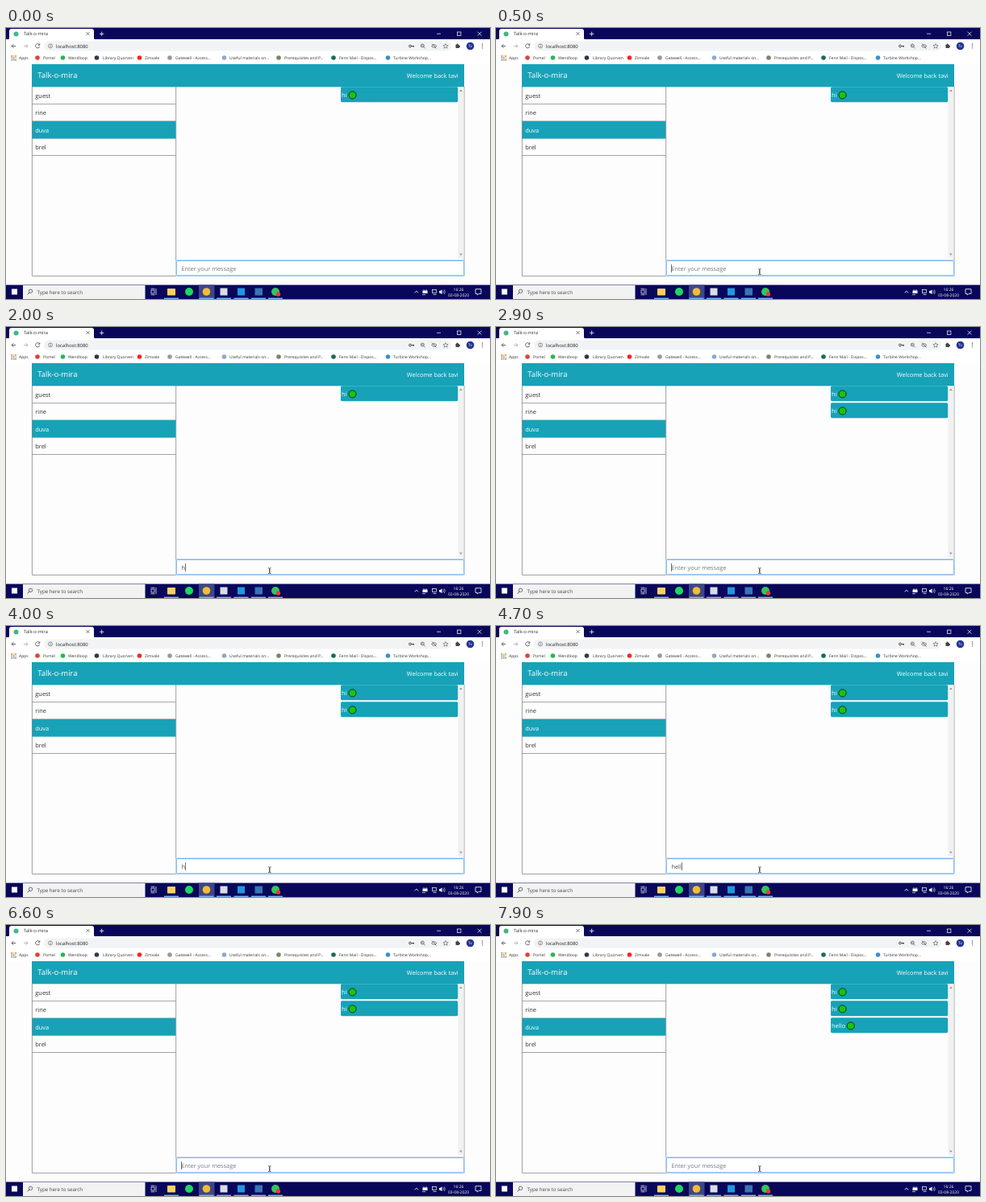
Recreate the animation shown at these times as an HTML page. Size 600 by 337 pixels, loop 8 s.

```html
<!DOCTYPE html>
<html lang="en">
<head>
<meta charset="utf-8">
<title>Chat</title>
<style>
html, body { margin: 0; width: 100%; height: 100%; overflow: hidden; background: #fdfdfe; }
svg { display: block; width: 100vw; height: 100vh; }
text { font-family: "Open Sans", "Noto Sans", sans-serif; text-rendering: geometricPrecision; white-space: pre; }
</style>
</head>
<body>
<svg id="stage" viewBox="0 0 600 337" preserveAspectRatio="none"></svg>
<script>
const LOOP = 8000, TEAL = '#17a2b8', NAVY = '#08075a';
const stage = document.getElementById('stage');

const rect = (x, y, w, h, fill, more = '') =>
  `<rect x="${x}" y="${y}" width="${w}" height="${h}" fill="${fill}" ${more}/>`;
const dot = (x, y, r, fill, more = '') =>
  `<circle cx="${x}" cy="${y}" r="${r}" fill="${fill}" ${more}/>`;
const line = (d, stroke, width = 1, more = '') =>
  `<path d="${d}" fill="none" stroke="${stroke}" stroke-width="${width}" ${more}/>`;
const label = (x, y, size, fill, str, more = '') =>
  `<text x="${x}" y="${y}" font-size="${size}" fill="${fill}" ${more}>${str}</text>`;
const END = 'text-anchor="end"', MID = 'text-anchor="middle"';

function titleBar() {
  return rect(0, 0, 600, 15, NAVY) +
    '<path d="M1 15Q4 15 4 12V4Q4 1 7 1H106Q109 1 109 4V12Q109 15 112 15Z" fill="#fff"/>' +
    dot(12.5, 7.5, 3, '#41b883') +
    label(22, 9.4, 5.8, '#333', 'Talk-o-mira') +
    line('M99.5 5l4 4m0-4l-4 4', '#444', .7) +
    line('M116 7.3h5.4m-2.7-2.7v5.4', '#fff', .8) +
    line('M534 7.2h5M584.5 4.7l5 5m0-5l-5 5', '#fff', .7) +
    rect(559.5, 5, 4.4, 4.4, 'none', 'stroke="#fff" stroke-width=".7"');
}

function toolbar() {
  return rect(0, 14, 600, 31, '#fff') + rect(47, 16.5, 505, 12, '#f1f3f4', 'rx="6"') +
    line('M12 22.5H7m2.5-2.5L7 22.5 9.5 25', '#444', .8) +
    line('M22 22.5h5m-2.5-2.5l2.5 2.5-2.5 2.5', '#aaa', .8) +
    line('M41.4 20.8a2.6 2.6 0 1 0 .3 2.4M41.8 19.4v1.9h-1.9', '#444', .8) +
    line('M55 21.8v2.1M55 20.4v.7', '#555', .6) +
    dot(55, 22.4, 2.5, 'none', 'stroke="#555" stroke-width=".6"') +
    label(62, 24.6, 5.9, '#222', 'localhost:8080') +
    dot(501, 22.5, 1.4, 'none', 'stroke="#444" stroke-width="1"') +
    line('M502.4 22.5h3.6m-1 0v1.4', '#444') +
    dot(516.3, 22, 2, 'none', 'stroke="#444" stroke-width=".7"') +
    line('M517.8 23.5l1.8 1.8m-4.4-3.3h2.2', '#444', .7) +
    line('M527.5 22.5q3-3.6 6.4 0q-3.4 3.6-6.4 0M528 19.5l5.5 6', '#444', .7) +
    line('M545 19.5l.9 2 2.2.2-1.7 1.4.6 2.1-2-1.2-2 1.2.6-2.1-1.7-1.4 2.2-.2Z', '#555', .6) +
    rect(557.5, 20.7, 4.4, 4.4, '#444', 'rx=".6"') +
    dot(559.5, 20.5, 1.1, '#444') + dot(562, 23, 1.1, '#444') +
    dot(575.5, 22.5, 4.8, '#253494') + label(575.5, 24.3, 4.6, '#fff', 'Tv', MID) +
    [20, 22.4, 24.8].map(y => dot(590.5, y, .65, '#444')).join('');
}

// x of the icon, its colour, x of the label, label
const bookmarks = [
  [39, '#dc4437', 46, 'Pomel'],
  [70.5, '#25b94f', 77, 'Wendloop'],
  [112.5, '#30364c', 120, 'Library Quorven'],
  [165.5, '#f22', 172, 'Zimvale'],
  [203, '#999', 210, 'Gatewell - Access...'],
  [270.5, '#8aa9d0', 277, 'Useful materials on...'],
  [338, '#7b8565', 345, 'Prerequisites and P...'],
  [406, '#176b54', 413, 'Fenn Mail - Dispos...'],
  [473.5, '#3d8fc8', 480, 'Turbine Workshop...']
];

function bookmarkBar() {
  const colors = ['#e94335', '#f4b400', '#34a853', '#4285f4'];
  let out = '';
  for (let i = 0; i < 9; i++)
    out += rect(6.5 + i % 3 * 2.4, 34.2 + Math.floor(i / 3) * 2.4, 1.5, 1.5, colors[i % 4]);
  out += label(16, 39, 5, '#333', 'Apps');
  for (const [ix, color, tx, name] of bookmarks)
    out += dot(ix, 37, 2.8, color) + label(tx, 39, 5, '#333', name);
  return out;
}

function page() {
  const people = ['guest', 'rine', 'duva', 'brel'];
  return rect(0, 45, 600, 275, '#fdfdfe') +
    people.map((name, i) => {
      const y = 73.3 + i * 21.3, active = i === 2;
      return (active ? rect(32, y, 178.5, 21.3, TEAL) : '') +
        line(`M32 ${y + 21.3}H210.5`, active ? TEAL : '#8b8d90', .8) +
        label(36.3, y + 13.7, 7.4, active ? '#fff' : '#333', name);
    }).join('') +
    line('M32.4 73V308.4H568V73M210.7 73V308', '#85878a', .8) +
    rect(32, 45, 536, 28.3, TEAL) +
    label(39.3, 62.3, 9.5, '#fff', 'Talk-o-mira') +
    label(560.7, 61.8, 7.4, '#fff', 'Welcome back tavi', END) +
    rect(560.3, 73.3, 7.2, 212.7, '#f1f1f1') +
    '<path d="M562 79l1.9-2.4 1.9 2.4ZM562 280.5l1.9 2.4 1.9-2.4Z" fill="#999"/>';
}

function bubble(row, word, circleX) {
  const y = 73.2 + row * 21;
  return `<g id="bubble${row}">` + rect(415, y, 145.2, 19, TEAL, 'rx="1.6"') +
    label(416, y + 12.8, 7.4, '#fff', word) +
    dot(circleX, y + 10.2, 4.6, '#16c60c', 'stroke="#1d2b1d" stroke-width="1"') + '</g>';
}

function inputBox() {
  return rect(211, 289, 357, 19.2, '#fff', 'rx="1.5" stroke="#b9d9fb" stroke-width="2"') +
    rect(211.4, 289.5, 356.2, 18.2, '#fff', 'rx="1.3" stroke="#78b0ea" stroke-width=".9"') +
    label(217.4, 301.9, 7.35, '#747b82', 'Enter your message', 'id="hint"') +
    label(217.4, 301.9, 7.35, '#495057', '', 'id="typed"') +
    rect(217.3, 294, .7, 10, '#333', 'id="caret"') +
    line('M325 299.6q1.8 0 1.8 1v5q0 1-1.8 1M328.6 299.6q-1.8 0-1.8 1v5q0 1 1.8 1', '#222', .7, 'id="pointer"');
}

function taskbar() {
  const underline = x => rect(x - 9, 335.6, 18, 1.4, '#79b5ec');
  return rect(0, 319.5, 600, 17.5, NAVY) +
    rect(7, 324.5, 7, 7, '#fff') +
    rect(21, 320, 151.5, 17, '#f2f2f3') +
    dot(30.5, 327.3, 2.2, 'none', 'stroke="#333" stroke-width=".7"') +
    line('M29 329l-2.4 2.5', '#333', .8) +
    label(38.5, 330.8, 6.2, '#444', 'Type here to search') +
    rect(239, 319.5, 19.5, 17.5, '#3d4686') +
    rect(180, 326, 4, 4, 'none', 'stroke="#fff" stroke-width=".7"') +
    line('M179.6 324.2h4.8M179.6 331.8h4.8M186 324v8', '#fff', .7) +
    rect(200, 324, 10, 8.5, '#f8d25c', 'rx=".7"') +
    dot(227, 328, 5, '#1ed760') +
    dot(248.5, 328, 4.8, '#f2bd32') +
    rect(265.5, 323.5, 9, 9, '#d9dde5') +
    rect(287, 323.5, 9, 9, '#2196e0') +
    rect(308.5, 323.5, 9.5, 9, '#3975b5') +
    dot(334, 328, 5, '#35c557') + dot(337.5, 331, 2.7, '#e33d39') +
    [205, 248.5, 270, 291.5, 313, 334].map(underline).join('') +
    line('M506.5 329.3l2.3-2.3 2.3 2.3', '#fff', .8) +
    rect(516.5, 326.5, 6, 3.5, '#fff') +
    line('M518 325v1.5M521 325v1.5M516 331.6h4', '#fff', .7) +
    rect(528.5, 325.5, 5, 4, 'none', 'stroke="#fff" stroke-width=".7"') +
    line('M529.5 331.5h4', '#fff', .7) +
    '<path d="M537 327h1.4l2-1.8v6l-2-1.8H537Z" fill="#fff"/>' +
    line('M541.7 326.5q1.3 1.7 0 3.5M543.2 325.3q2.2 3 0 5.8', '#fff', .6) +
    label(561, 326.5, 5, '#fff', '16:26', MID) +
    label(561, 334.3, 5, '#fff', '03-08-2020', MID) +
    line('M582 324.7h7v5.7h-3l-1.7 1.7v-1.7H582Z', '#fff', .8);
}

stage.innerHTML = titleBar() + toolbar() + bookmarkBar() + page() +
  bubble(0, 'hi', 429.5) + bubble(1, 'hi', 429.5) + bubble(2, 'hello', 439.7) +
  inputBox() + taskbar();

const part = id => document.getElementById(id);
const [hint, typed, caret, pointer] = ['hint', 'typed', 'caret', 'pointer'].map(part);
const show = (el, on) => el.setAttribute('visibility', on ? 'visible' : 'hidden');

const SENT_HI = 2450, SENT_HELLO = 7800, POINTER_AT = 500;
// Each edit restarts the caret blink
const edits = [
  [-750, ''], [2000, 'h'], [2150, 'hi'], [SENT_HI, ''],
  [3900, 'h'], [4100, 'he'], [4300, 'hel'], [4500, 'hell'], [4850, 'hello'],
  [5000, 'hell'], [5080, 'hel'], [5160, 'he'], [5240, 'h'], [5320, ''],
  [7300, 'h'], [7400, 'he'], [7500, 'hel'], [7600, 'hell'], [7700, 'hello'],
  [SENT_HELLO, '']
];

function draw(t) {
  const [since, text] = edits.filter(([at]) => at <= t).pop();
  if (typed.textContent !== text) typed.textContent = text;
  show(hint, !text);
  caret.setAttribute('x', 217.3 + (text ? typed.getComputedTextLength() + .3 : 0));
  const blinkOn = Math.floor((t - since) / 500) % 2 === 0;
  show(caret, blinkOn && t < SENT_HELLO);
  show(pointer, t >= POINTER_AT);
  show(part('bubble1'), t >= SENT_HI);
  show(part('bubble2'), t >= SENT_HELLO);
}

const start = performance.now();
function tick() {
  draw((performance.now() - start) % LOOP);
  requestAnimationFrame(tick);
}
tick();
</script>
</body>
</html>
```
